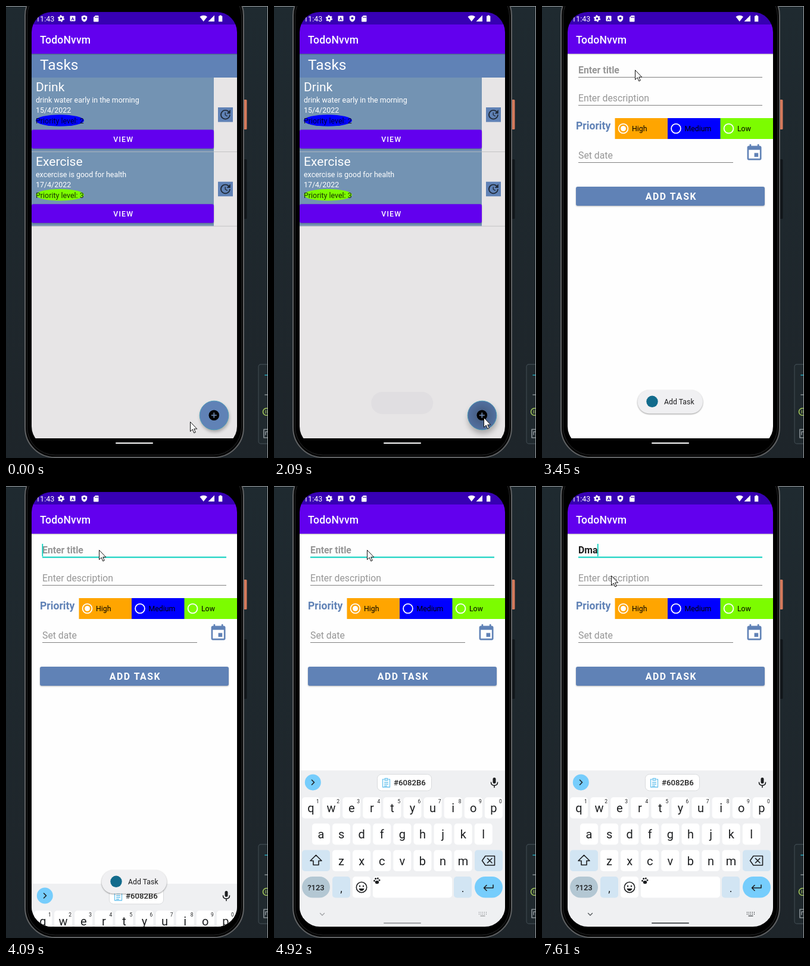
Recreate the animation shown at these times as an HTML page. Size 440x758 px, loop 8000 ms.

```html
<!DOCTYPE html>
<html lang="en">
<head>
<meta charset="utf-8">
<title>Todo app</title>
<style>
html, body { margin: 0; width: 100%; height: 100%; overflow: hidden; background: #1f282d; }
svg { display: block; width: 440px; height: 758px; font-family: Roboto, sans-serif; }
.mid { text-anchor: middle; }
.body { font-size: 12.45px; }
.field { font-size: 15.8px; fill: #969696; }
.bold { font-weight: 700; }
.medium { font-weight: 500; }
.line { fill: none; stroke-linecap: round; stroke-linejoin: round; }
.low { filter: drop-shadow(0 1px 1px #0004); }
</style>
</head>
<body>
<svg viewBox="0 0 440 758">
  <defs>
    <clipPath id="glass"><rect x="43" y="10" width="345" height="729" rx="34"/></clipPath>
    <linearGradient id="desk" x2="0" y2="1"><stop stop-color="#1f2a30"/><stop offset="1" stop-color="#1e252a"/></linearGradient>
    <radialGradient id="ripple"><stop stop-color="#435879"/><stop offset="1" stop-color="#5270a0"/></radialGradient>
  </defs>

  <rect width="440" height="758" fill="url(#desk)"/>
  <g class="line" stroke="#8a9297" stroke-width="1.6">
    <rect x="424" y="601" width="30" height="133" rx="4" fill="#20292e" stroke="#3b464c" stroke-width="1.3"/>
    <path d="M435 619h9" stroke="#20a8bd"/><path d="M435 652h9"/>
    <circle cx="437.5" cy="680.5" r="6" stroke="#a4c95a"/><path d="M436 678v5m3-5v5" stroke="#a4c95a" stroke-width="1"/>
    <path d="M440 710h-7v14h7m-4-10h4m-4 0v5"/>
  </g>
  <path d="M0 .5H440M439.5 0V758" stroke="#a4a8aa"/>

  <rect x="399" y="157" width="5.5" height="50" rx="1.5" fill="#d57a5c"/>
  <rect x="399" y="257" width="5.5" height="100" rx="1.5" fill="#11161a"/>
  <rect x="32" y="-34" width="367" height="791" rx="50" fill="#050505" stroke="#606264" stroke-width="2"/>
  <rect x="35.5" y="-30" width="360" height="783" rx="47" fill="#000" stroke="#262728"/>

  <g clip-path="url(#glass)">
    <rect x="43" y="10" width="345" height="729"/>

    <g id="listPage">
      <rect x="43" y="80" width="345" height="645" fill="#e7e5e6"/>
      <rect x="43" y="80" width="345" height="40" fill="#6082b6"/>
      <text x="57" y="107" font-size="24.6" fill="#fff">Tasks</text>
      <g id="rows"></g>
      <circle id="fabShadow" cx="350.5" r="24.5" fill="#0004"/>
      <circle id="fab" cx="349.5" cy="686.5" r="24.3" stroke="#3f9fb9" stroke-width=".8"/>
      <circle cx="349.3" cy="686.3" r="8.8"/>
      <path d="M344.8 686.3h9m-4.5-4.5v9" stroke="#6d87b0" stroke-width="1.7"/>
    </g>

    <g id="formPage">
      <rect x="43" y="80" width="345" height="645" fill="#fefefe"/>
      <text id="title" class="field bold" x="61" y="113"></text>
      <rect id="caret" y="97" width="1.7" height="21" fill="#03cfbd"/>
      <path id="titleLine" d="M61 119.5H370"/>
      <text class="field" x="61" y="160">Enter description</text>
      <text class="field" x="61" y="256">Set date</text>
      <path d="M61 166.5H370M61 262.5H321" stroke="#808080"/>
      <text class="bold" x="57" y="207" font-size="17.6" fill="#6082b6">Priority</text>
      <g id="radios"></g>
      <path transform="translate(340.6 230.5) scale(1.33)" fill="#6082b6" d="M17 12h-5v5h5zM16 1v2H8V1H6v2H5c-1.1 0-2 .9-2 2v14c0 1.1.9 2 2 2h14c1.1 0 2-.9 2-2V5c0-1.1-.9-2-2-2h-1V1zm3 18H5V8h14z"/>
      <rect class="low" x="57" y="303" width="317" height="32" rx="3" fill="#6082b6"/>
      <text class="mid bold" x="217" y="325" font-size="15.8" letter-spacing="1.55" fill="#fff">ADD TASK</text>
    </g>

    <rect x="43" y="80" width="345" height="1.5" fill="#0003"/>
    <rect x="43" y="10" width="345" height="21" fill="#3700b3"/>
    <rect x="43" y="31" width="345" height="49" fill="#6200ee"/>
    <text class="medium" x="57" y="63" font-size="17.6" letter-spacing=".15" fill="#fff">TodoNvvm</text>
    <g fill="#fff">
      <text x="50" y="26" font-size="12.6">11:43</text>
      <circle cx="92.5" cy="21" r="3.1" fill="none" stroke="#fff" stroke-width="2.6"/>
      <circle cx="92.5" cy="21" r="4.8" fill="none" stroke="#fff" stroke-width="1.8" stroke-dasharray="2.5 2.527"/>
      <rect x="107.5" y="16.5" width="9" height="9" rx="1"/>
      <path d="M131.5 15.5l4.7 1.8v3.5q0 4-4.7 6-4.7-2-4.7-6v-3.5z"/>
      <path d="M150 16h4.5q1 0 1 1v8.5q0 1-1 1h-6.5q-1 0-1-1v-6.5z"/>
      <path d="M325.5 18q6.5-4.6 12.5 0l-6.3 8z"/>
      <path d="M350 15.5v10.5h-10.5z"/>
      <path d="M358.7 15.5h3v1.2h1.6v9.6h-6.3v-9.6h1.7z"/>
    </g>
    <g fill="#3700b3">
      <text class="mid bold" x="112" y="24" font-size="7.5">A</text>
      <circle cx="131.5" cy="20.5" r="2"/>
      <path d="M149.5 18h1v2h-1zm2 0h1v2h-1zm2 0h1v2h-1z"/>
    </g>

    <g id="keyboard"></g>
    <g id="nav" class="line" stroke="#55595c" stroke-width="1.4">
      <path d="M77.5 716.5l3.5 3.5 3.5-3.5"/>
      <path d="M344 715h13m-13 3h13" stroke-dasharray="1 2" stroke-width="1.8" stroke-linecap="butt"/>
      <path d="M347 721h7"/>
    </g>
    <path id="home" class="line" d="M185 733H246" stroke-width="2"/>

    <g id="toast">
      <rect id="pill" x="160.5" y="644" width="109.5" height="39.5" rx="19.7"/>
      <g id="toastBody">
        <circle cx="185" cy="663.3" r="9.7" fill="#126b8c"/>
        <text x="205" y="668" font-size="12.3" fill="#1f1f21">Add Task</text>
      </g>
    </g>
  </g>

  <path id="mouse" d="M.5.5v16l3.7-3.5 2.6 6 2.5-1.1-2.6-5.7h5z" fill="#fff" stroke="#111"/>
</svg>

<script>
const $ = id => document.getElementById(id);
const set = (id, attrs) => Object.entries(attrs).forEach(([k, v]) => $(id).setAttribute(k, v));
const text = (x, y, size, label, more = '') => `<text x="${x}" y="${y}" font-size="${size}" ${more}>${label}</text>`;

// Task list
const updateIcon = 'M21 10.12h-6.78l2.74-2.82c-2.73-2.7-7.15-2.8-9.88-.1-2.73 2.71-2.73 7.08 0 9.79s7.15 2.71 9.88 0C18.32 15.65 19 14.08 19 12.1h2c0 1.98-.88 4.55-2.64 6.29-3.51 3.48-9.21 3.48-12.72 0-3.5-3.47-3.53-9.11-.02-12.58s9.14-3.47 12.65 0L21 3zM12.5 8v4.25l3.5 2.08-.72 1.21L11 13V8z';
const taskRow = (y, name, detail, date, level, color) => `<g transform="translate(0 ${y})">
  <rect x="43" width="306" height="124.5" fill="#7393b3"/>
  <g fill="#fff" class="body">
    ${text(50, 23, 21.1, name)}<text x="50" y="42">${detail}</text><text x="50" y="59">${date}</text>
  </g>
  <ellipse cx="90.5" cy="72" rx="40.5" ry="9.8" fill="${color}"/>
  <text class="body" x="50" y="77" fill="#000c">Priority level: ${level}</text>
  <rect class="low" x="43" y="87.5" width="306" height="31.5" rx="3" fill="#6200ee"/>
  ${text(197.3, 108, 12.3, 'VIEW', 'class="mid medium" letter-spacing="1.2" fill="#fff"')}
  <rect x="356" y="50" width="25" height="24.5" fill="#6082b6"/>
  <path transform="translate(357.3 51) scale(.93)" fill="#202a38" d="${updateIcon}"/>
  <path d="M43 124.5H388" stroke="#c4c4c4"/></g>`;
$('rows').innerHTML =
  taskRow(120, 'Drink', 'drink water early in the morning', '15/4/2022', 2, '#00f') +
  taskRow(244.7, 'Exercise', 'excercise is good for health', '17/4/2022', 3, '#7cfc00');

// Priority choices
$('radios').innerHTML = [['High', '#ffa500'], ['Medium', '#00f'], ['Low', '#7cfc00']].map(([label, color], i) => {
  const x = 122.5 + i * 88.5;
  return `<rect x="${x}" y="188" width="89" height="35" fill="${color}"/>
    <circle cx="${x + 14}" cy="205.5" r="7.9" fill="none" stroke="#fff" stroke-width="1.8"/>
    ${i ? '' : `<circle cx="${x + 14}" cy="205.5" r="4.5" fill="#fff"/>`}
    ${text(x + 28.5, 210, 12.3, label)}`;
}).join('');

// Keyboard
const key = (x, y, w, fill = '#fff', r = 5) => `<rect x="${x}" y="${y}" width="${w}" height="35.5" rx="${r}" fill="${fill}"/>`;
const letters = (row, x, y) => [...row].map((c, i) => {
  const cx = x + i * 34.1;
  const hint = row.length > 9 ? text(cx + 11.5, y + 9.5, 8.5, (i + 1) % 10, 'class="mid"') : '';
  return key(cx - 15, y, 30) + text(cx, y + 25, 20, c, 'class="mid"') + hint;
}).join('');
const tint = '#d2e5f3', sky = '#76cdfc';
$('keyboard').innerHTML = `
  <rect x="43" y="477" width="345" height="480" fill="#eff0f2"/>
  <circle cx="65.3" cy="497" r="13.5" fill="${sky}"/>
  <rect x="173.5" y="483.5" width="91" height="27.5" rx="7" fill="#fff" stroke="#d9dbdd"/>
  ${text(201, 502, 13.2, '#6082B6', 'class="medium" fill="#222"')}
  <g fill="#1d1f21">
    ${letters('qwertyuiop', 62, 522)}${letters('asdfghjkl', 79, 566)}${letters('zxcvbnm', 113, 610.5)}
    ${key(47, 610.5, 47, tint)}${key(337, 610.5, 47, tint)}
    ${key(47, 655, 47, '#b3c7d3', 17.7)}${key(98, 655, 30, tint)}${key(132, 655, 30)}
    ${key(166, 655, 133)}${key(302, 655, 30, tint)}${key(337, 655, 47, sky, 17.7)}
    ${text(70.5, 678, 13, '?123', 'class="mid medium"')}
    ${text(113, 681, 18, ',', 'class="mid"')}${text(317, 681, 18, '.', 'class="mid"')}
    <circle cx="144" cy="671" r="1.3"/><circle cx="150" cy="671" r="1.3"/>
    <path d="M142.5 675h9q-1 4-4.5 4t-4.5-4z"/>
    <ellipse cx="173" cy="664.5" rx="3.2" ry="2.7"/>
    <circle cx="168.5" cy="662" r="1.5"/><circle cx="170.7" cy="658.5" r="1.5"/>
    <circle cx="174.3" cy="658" r="1.5"/><circle cx="177" cy="661" r="1.5"/>
    <rect x="367.5" y="489" width="5" height="10" rx="2.5"/>
  </g>
  <g class="line" stroke="#1d1f21" stroke-width="1.6">
    <path d="M63.5 493l4 4-4 4"/>
    <path d="M364.5 497q0 5 5.5 5t5.5-5M370 502v3.5"/>
    <circle cx="147" cy="673" r="8.7"/>
    <path d="M70.5 619l-9.5 9.5h5v7h9v-7h5z"/>
    <path d="M355 620.5h15.5v15.5H355l-5.5-7.7zM358.5 624.5l7.5 7.5m0-7.5l-7.5 7.5"/>
    <path d="M368 669v5h-15m4-4.5l-4.5 4.5 4.5 4.5"/>
    <path d="M184 492h-1.5v13h12v-13H193M186 490.5h5v3h-5zM185.5 497h6m-6 3h6m-6 3h4" stroke="#6cc4ee" stroke-width="1.3"/>
  </g>`;

// Held steps: [time, ...values]
const mousePath = [
  [0, 309, 697], [120, 305, 697], [270, 312, 692], [420, 322, 696], [540, 332, 698], [690, 340, 695],
  [850, 348, 693], [970, 352, 692], [1960, 352, 690], [2790, 250, 400], [2910, 162, 173], [3060, 160, 131],
  [3180, 159, 112], [3330, 157, 108], [3450, 156, 107], [7190, 146, 121], [7310, 135, 135], [7460, 124, 147], [7610, 116, 150]
];
const toastSteps = [ // pill opacity, body opacity, scale, drop
  [0, 0, 0, 1, 0], [2090, .6, 0, .95, 2], [2240, .95, .13, .97, 0], [2390, 1, .65, .99, 0],
  [2510, 1, 1, 1, 0], [4540, .5, .5, .98, 0], [4670, 0, 0, 1, 0]
];
const typedSteps = [[0, ''], [5310, 'D'], [6380, 'Dm'], [6500, 'Dma']];
const caretSteps = [[0, 0], [3970, 1], [4540, 0], [5050, 1], [5830, 0], [6380, 1], [7070, 0], [7460, 1]];
const keyboardSteps = [[0, 300], [4090, 190], [4240, 2], [4390, 0]];
const navSteps = [[0, 0], [4240, .05], [4390, .1], [4540, .22], [4670, .35], [4920, .5], [5050, .62], [5310, .78], [5440, .9], [5680, 1]];
const at = (steps, t) => steps.findLast(s => s[0] <= t).slice(1);

function draw() {
  const t = performance.now() % 8000;
  const form = t >= 2240, focused = t >= 3970, keys = t >= 4090, pressed = t >= 1960;
  set('listPage', { visibility: form ? 'hidden' : 'visible' });
  set('formPage', { visibility: form ? 'visible' : 'hidden' });
  set('fab', { fill: t >= 2090 ? 'url(#ripple)' : pressed ? '#5876a7' : '#6082b6' });
  $('fabShadow').style.filter = pressed ? 'blur(5px)' : 'blur(2.5px)';
  set('fabShadow', { cy: pressed ? 693 : 690 });

  const [typed] = at(typedSteps, t);
  $('title').textContent = typed || 'Enter title';
  $('title').style.fill = typed ? '#1c1c1c' : '';
  set('titleLine', { stroke: focused ? '#03cfbd' : '#808080', 'stroke-width': focused ? 2 : 1 });
  const caretX = typed ? 60.5 + $('title').getComputedTextLength() : 60.5;
  set('caret', { x: caretX, opacity: at(caretSteps, t)[0] });

  const [navAlpha] = at(navSteps, t);
  set('keyboard', { transform: `translate(0 ${at(keyboardSteps, t)[0]})`, visibility: keys ? 'visible' : 'hidden' });
  set('nav', { opacity: navAlpha });
  set('home', { stroke: keys ? '#55595c' : '#fff', opacity: keys ? navAlpha : 1 });

  const [pill, body, scale, drop] = at(toastSteps, t);
  set('toast', { transform: `translate(215 ${664 + drop}) scale(${scale}) translate(-215 -664)` });
  set('pill', { opacity: pill, fill: form ? '#f0f0f2' : '#dddbde' });
  $('pill').style.filter = form ? 'drop-shadow(0 1px 1px #0006)' : 'none';
  set('toastBody', { opacity: body });
  set('mouse', { transform: `translate(${at(mousePath, t)})` });
  requestAnimationFrame(draw);
}
draw();
</script>
</body>
</html>
```
